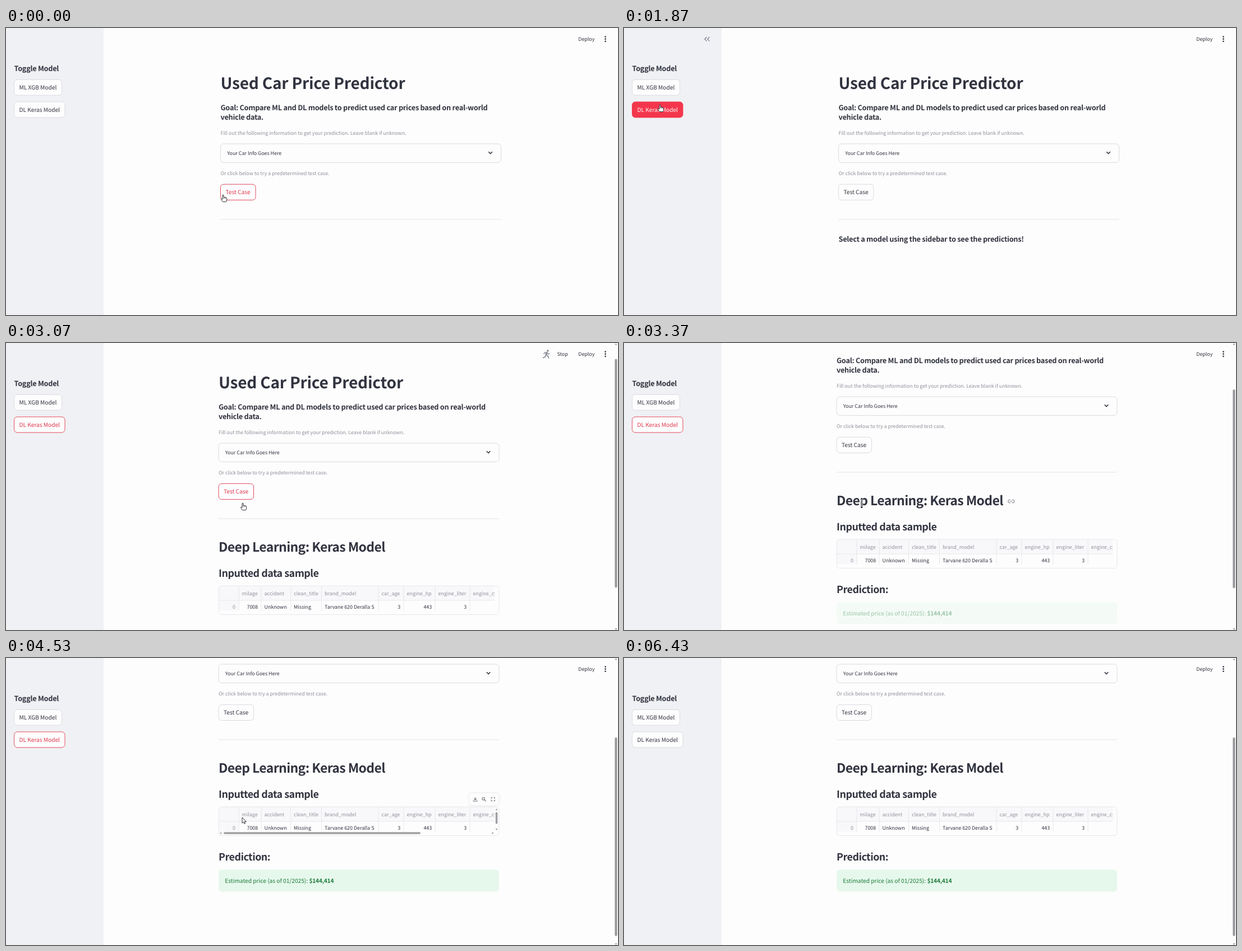
An HTML page with a canvas that plays this animation: 1091 px wide and 513 px high, repeating every 6.46 s.

```html
<!DOCTYPE html>
<html lang="en">
<head>
<meta charset="utf-8">
<title>Used Car Price Predictor</title>
<style>
  html, body { margin: 0; width: 100%; height: 100%; overflow: hidden; background: #fdfdfd; }
  canvas { display: block; width: 1091px; height: 513px; }
</style>
</head>
<body>
<canvas id="stage"></canvas>
<script>
const W = 1091, H = 513, LOOP = 6460;
const REM = 11.36;
const FONT = '"Noto Sans CJK JP", "Noto Sans CJK SC", "Noto Sans CJK", "Open Sans", sans-serif';
const GLYPH_SCALE = 0.895;
const INK = '#31333f', GREY = '#8f919b', RED = '#e0374d', FILL_RED = '#f4364c';
const LINE = '#d6d7de', PAGE = '#fdfdfd', SIDE = '#f0f1f4';

const canvas = document.getElementById('stage');
const ctx = canvas.getContext('2d');
const dpr = window.devicePixelRatio || 1;
canvas.width = W * dpr;
canvas.height = H * dpr;

const clamp = v => Math.max(0, Math.min(1, v));
const smooth = v => v * v * (3 - 2 * v);
const between = (t, a, b) => t >= a && t < b;

// Value of a track of [time, ...values] keys at time t
function track(keys, t, ease) {
  let i = 1;
  while (i < keys.length - 1 && t > keys[i][0]) i++;
  const a = keys[i - 1], b = keys[i];
  const k = ease(clamp((t - a[0]) / (b[0] - a[0])));
  return a.slice(1).map((v, n) => v + (b[n + 1] - v) * k);
}

const POINTER = [
  [0, 387, 298], [750, 387, 298], [1650, 64, 137], [2000, 64, 137],
  [2700, 422, 286], [3070, 422, 286], [3370, 424, 286], [3670, 421, 285],
  [4850, 421, 285], [5250, 470, 535]
];
const SCROLL = [[2960, 0], [3070, 28], [3370, 111], [3660, 193], [3800, 196]];

const BTN_ML = [14.5, 92.2, 85, 28];
const BTN_DL = [14.5, 132, 90.5, 28];
const BTN_TEST = [382.5, 279.3, 62.5, 28.2];
const inside = ([x, y, w, h], px, py) => px > x && px < x + w && py > y && py < y + h;

function text(str, x, y, rem, { color = INK, weight = 400, align = 'left', track = 0 } = {}) {
  const size = rem * REM;
  ctx.font = `${weight} ${size * GLYPH_SCALE}px ${FONT}`;
  ctx.letterSpacing = `${track * size}px`;
  ctx.textAlign = align;
  ctx.fillStyle = color;
  ctx.fillText(str, x, y);
}

function heading(str, x, y, rem) {
  text(str, x, y, rem, { weight: 700, track: rem > 1.3 ? -0.022 : -0.017 });
}

function box(x, y, w, h, r, fill, stroke) {
  ctx.beginPath();
  ctx.roundRect(x, y, w, h, r);
  if (fill) { ctx.fillStyle = fill; ctx.fill(); }
  if (stroke) { ctx.strokeStyle = stroke; ctx.lineWidth = 0.9; ctx.stroke(); }
}

function path(points, color, width) {
  ctx.beginPath();
  points.forEach(([x, y], i) => i ? ctx.lineTo(x, y) : ctx.moveTo(x, y));
  ctx.strokeStyle = color;
  ctx.lineWidth = width;
  ctx.stroke();
}

function disc(x, y, r, color) {
  ctx.beginPath();
  ctx.arc(x, y, r, 0, 7);
  ctx.fillStyle = color;
  ctx.fill();
}

function arrow(x, y, dx, dy, color) {
  ctx.beginPath();
  ctx.moveTo(x + dx * 2, y + dy * 2);
  ctx.lineTo(x - dx - dy * 2, y - dy - dx * 2);
  ctx.lineTo(x - dx + dy * 2, y - dy + dx * 2);
  ctx.fillStyle = color;
  ctx.fill();
}

function button([x, y, w, h], label, state) {
  const pressed = state === 'press';
  box(x, y, w, h, 5.7, pressed ? FILL_RED : PAGE, pressed ? FILL_RED : state ? RED : LINE);
  text(label, x + 9, Math.round(y + 17.8), 1, { color: pressed ? '#fff' : state ? RED : INK });
}

function linkIcon(x, y) {
  ctx.strokeStyle = '#85878f';
  ctx.lineWidth = 1.1;
  for (const side of [-1, 1]) {
    ctx.beginPath();
    ctx.moveTo(x + side * 1.2, y - 2.7);
    ctx.lineTo(x + side * 2.8, y - 2.7);
    ctx.arc(x + side * 2.8, y, 2.7, -Math.PI / 2, Math.PI / 2, side < 0);
    ctx.lineTo(x + side * 1.2, y + 2.7);
    ctx.stroke();
  }
  path([[x - 2.2, y], [x + 2.2, y]], '#85878f', 1.1);
}

function sidebar(s) {
  ctx.fillStyle = SIDE;
  ctx.fillRect(0, 0, 174, H);
  heading('Toggle Model', 14.5, 77, 1.25);
  button(BTN_ML, 'ML XGB Model', '');
  button(BTN_DL, 'DL Keras Model', s.dl);
  if (s.x < 174 && s.y < H) {
    for (const x of [147.5, 152.5]) {
      path([[x, 16], [x - 3.6, 19.8], [x, 23.6]], '#7d8090', 1.3);
    }
  }
}

function toolbar(s) {
  text('Deploy', 1020.3, 23, 0.875);
  for (const y of [15.6, 19.7, 23.8]) disc(1068.5, y, 1.35, INK);
  if (!s.running) return;
  text('Stop', 982.5, 23, 0.875);
  const c = '#8d8f98';
  disc(965.8, 13.9, 1.8, c);
  path([[964.6, 16.5], [962.2, 21.2]], c, 3);
  path([[962.2, 21.2], [966.3, 23.4], [967.4, 27.4]], c, 1.7);
  path([[962, 21.4], [961, 25], [957, 26.4]], c, 1.7);
  path([[964.6, 16.6], [960.3, 17], [958.6, 20]], c, 1.4);
  path([[964.6, 16.8], [966.2, 19.7], [969, 19.2]], c, 1.4);
}

function form(s) {
  const caption = { color: GREY };
  text('Used Car Price Predictor', 382.5, 109, 2.75, { weight: 700, track: -0.005 });
  heading('Goal: Compare ML and DL models to predict used car prices based on real-world', 382.5, 147, 1.25);
  heading('vehicle data.', 382.5, 164, 1.25);
  text('Fill out the following information to get your prediction. Leave blank if unknown.', 382.5, 191, 0.875, caption);
  box(382.5, 207, 500, 33.5, 5.7, '', LINE);
  text('Your Car Info Goes Here', 394.3, 227, 0.875);
  path([[860.2, 221.3], [863.5, 224.6], [866.8, 221.3]], INK, 1.5);
  text('Or click below to try a predetermined test case.', 382.5, 263, 0.875, caption);
  button(BTN_TEST, 'Test Case', s.test);
  path([[382.5, 342], [882.5, 342]], '#dfe0e6', 0.9);
}

// name, left edge, value, numeric
const COLUMNS = [
  ['milage', 418.5, '7008', true],
  ['accident', 458.5, 'Unknown'],
  ['clean_title', 511, 'Missing'],
  ['brand_model', 566, 'Tarvane 620 Deralla S'],
  ['car_age', 667.5, '3', true],
  ['engine_hp', 712.5, '443', true],
  ['engine_liter', 768.5, '3', true],
  ['engine_cylinders', 830.5, '']
];

function table(s) {
  const x = 382.5, y = 462, w = 500, h = 51.5, small = 0.875;
  ctx.save();
  ctx.beginPath();
  ctx.roundRect(x, y, w, h, 5.7);
  ctx.clip();
  ctx.save();
  ctx.beginPath();
  ctx.rect(x, y, 492.3, 44.3);
  ctx.clip();
  ctx.fillStyle = '#f8f8fa';
  ctx.fillRect(x, y, 493, 26);
  ctx.fillRect(x, y, 36, 45);
  path([[x, 488], [x + 493, 488]], '#e5e6ea', 0.9);
  text('0', 412.5, 503, small, { color: GREY, align: 'right' });
  COLUMNS.forEach(([name, left, value, numeric], i) => {
    path([[left, y], [left, 507]], '#e5e6ea', 0.9);
    text(name, left + 5.6, 479, small, { color: GREY });
    if (numeric) text(value, COLUMNS[i + 1][1] - 5.8, 503, small, { align: 'right' });
    else text(value, left + 5.6, 503, small);
  });
  ctx.restore();
  if (s.tableHover) {
    const bar = '#a0a0a3';
    box(391.5, 507.2, 351, 3.6, 1.8, bar);
    arrow(386.5, 509, -1, 0, bar);
    arrow(871, 509, 1, 0, bar);
    box(876.2, 471.5, 3.6, 21, 1.8, bar);
    arrow(878, 467, 0, -1, bar);
    arrow(878, 502, 0, 1, bar);
  }
  ctx.restore();
  box(x, y, w, h, 5.7, '', '#e5e6ea');
  if (s.tableHover) tableTools();
}

function tableTools() {
  const c = '#74767f';
  ctx.save();
  ctx.shadowColor = 'rgba(0,0,0,.13)';
  ctx.shadowBlur = 4;
  box(829.5, 438, 52.5, 21, 5, PAGE);
  ctx.restore();
  path([[840, 445], [840, 449.6]], c, 1.1);
  path([[837.7, 447.5], [840, 449.8], [842.3, 447.5]], c, 1.1);
  path([[836.8, 450.2], [836.8, 452], [843.2, 452], [843.2, 450.2]], c, 1.1);
  ctx.beginPath();
  ctx.arc(854.7, 447.6, 2.3, 0, 7);
  ctx.stroke();
  path([[856.4, 449.3], [859, 452]], c, 1.2);
  for (const sx of [-1, 1]) for (const sy of [-1, 1]) {
    path([[871.7 + sx, 448.5 + sy * 3], [871.7 + sx * 3, 448.5 + sy * 3], [871.7 + sx * 3, 448.5 + sy]], c, 1.1);
  }
}

function results(s) {
  heading('Deep Learning: Keras Model', 382.5, 401, 2.25);
  heading('Inputted data sample', 382.5, 446, 1.75);
  if (s.link === 1) linkIcon(693.8, 394);
  if (s.link === 2) linkIcon(573.8, 440);
  table(s);
  if (s.prediction <= 0) return;
  heading('Prediction:', 382.5, 558, 1.75);
  ctx.globalAlpha = s.prediction;
  const green = '#1b7a37';
  box(382.5, 574.2, 500, 39.4, 5.7, '#e6f8ec');
  text('Estimated price (as of 01/2025):', 393.8, 598, 1, { color: green });
  text('$144,414', 544, 598, 1, { color: green, weight: 700, track: -0.017 });
  ctx.globalAlpha = 1;
}

function pageScrollbar(s) {
  const total = s.prediction > 0 ? 723 : 628;
  const k = 500.6 / total;
  box(1085.3, 6.2 + s.scroll * k, 4.2, H * k, 2.1, '#9a9a9e');
  arrow(1087.4, 2.6, 0, -1, '#9a9a9e');
  arrow(1087.4, 511, 0, 1, '#9a9a9e');
}

const ARROW = new Path2D('M0 0V10.2L2.4 8L4 11.4L5.6 10.7L4.1 7.4H7.3Z');
const HAND = new Path2D('M-1 .8Q0 -.6 1 .8V4.4L2.2 4.2L3.2 4.8L4.6 4.7L5.4 5.4Q6.7 5.2 6.6 6.8V9Q6.6 11 5.4 12.7H-.6Q-1.8 10.9 -3.5 8.6Q-3.9 7 -2.4 7.2L-1 8.4Z');

function pointer({ x, y, cursor }) {
  ctx.save();
  ctx.translate(x, y);
  if (cursor === 'text') {
    for (const [color, width] of [['#fff', 2.4], ['#222', 1]]) {
      path([[0, -4.5], [0, 4.5]], color, width);
      path([[-2, -5], [-.5, -5], [0, -4.5], [.5, -5], [2, -5]], color, width);
      path([[-2, 5], [-.5, 5], [0, 4.5], [.5, 5], [2, 5]], color, width);
    }
  } else {
    const shape = cursor === 'hand' ? HAND : ARROW;
    ctx.fillStyle = '#fff';
    ctx.strokeStyle = '#1c1c22';
    ctx.lineWidth = 0.9;
    ctx.lineJoin = 'round';
    ctx.fill(shape);
    ctx.stroke(shape);
    if (cursor === 'hand') {
      for (const fx of [1, 2.9, 4.7]) path([[fx, 4.7], [fx, 7]], '#1c1c22', 0.6);
    }
  }
  ctx.restore();
}

function stateAt(t) {
  const [x, y] = track(POINTER, t, smooth);
  const scroll = Math.round(track(SCROLL, t, v => v)[0]);
  const overDl = inside(BTN_DL, x, y);
  // Hover keeps its old target for a moment while the page scrolls
  const overTest = t < 3250 && inside(BTN_TEST, x, y);
  let cursor = 'arrow';
  if (overDl || overTest) cursor = 'hand';
  else if (between(t, 3250, 3850)) cursor = 'text';
  return {
    x, y, scroll, cursor,
    dl: between(t, 1820, 1940) ? 'press' : overDl || between(t, 1940, 5900) ? 'focus' : '',
    test: between(t, 200, 320) ? 'press' : t < 1820 || overTest ? 'focus' : '',
    running: between(t, 350, 750) || between(t, 2050, 3300),
    prompt: between(t, 700, 2400),
    results: t >= 2400,
    prediction: clamp((t - 3270) / 240),
    link: between(t, 3250, 3500) ? 1 : between(t, 3500, 3850) ? 2 : 0,
    tableHover: t >= 3850 && y < 317
  };
}

function draw(t) {
  const s = stateAt(t);
  ctx.setTransform(dpr, 0, 0, dpr, 0, 0);
  ctx.textRendering = 'geometricPrecision';
  ctx.fillStyle = PAGE;
  ctx.fillRect(0, 0, W, H);
  ctx.save();
  ctx.translate(s.results ? -3.5 : 0, -s.scroll);
  form(s);
  if (s.prompt) heading('Select a model using the sidebar to see the predictions!', 382.5, 382, 1.25);
  if (s.results) results(s);
  ctx.restore();
  sidebar(s);
  toolbar(s);
  if (s.results) pageScrollbar(s);
  pointer(s);
}

const start = performance.now();
function tick() {
  draw((performance.now() - start) % LOOP);
  requestAnimationFrame(tick);
}
tick();
</script>
</body>
</html>
```
